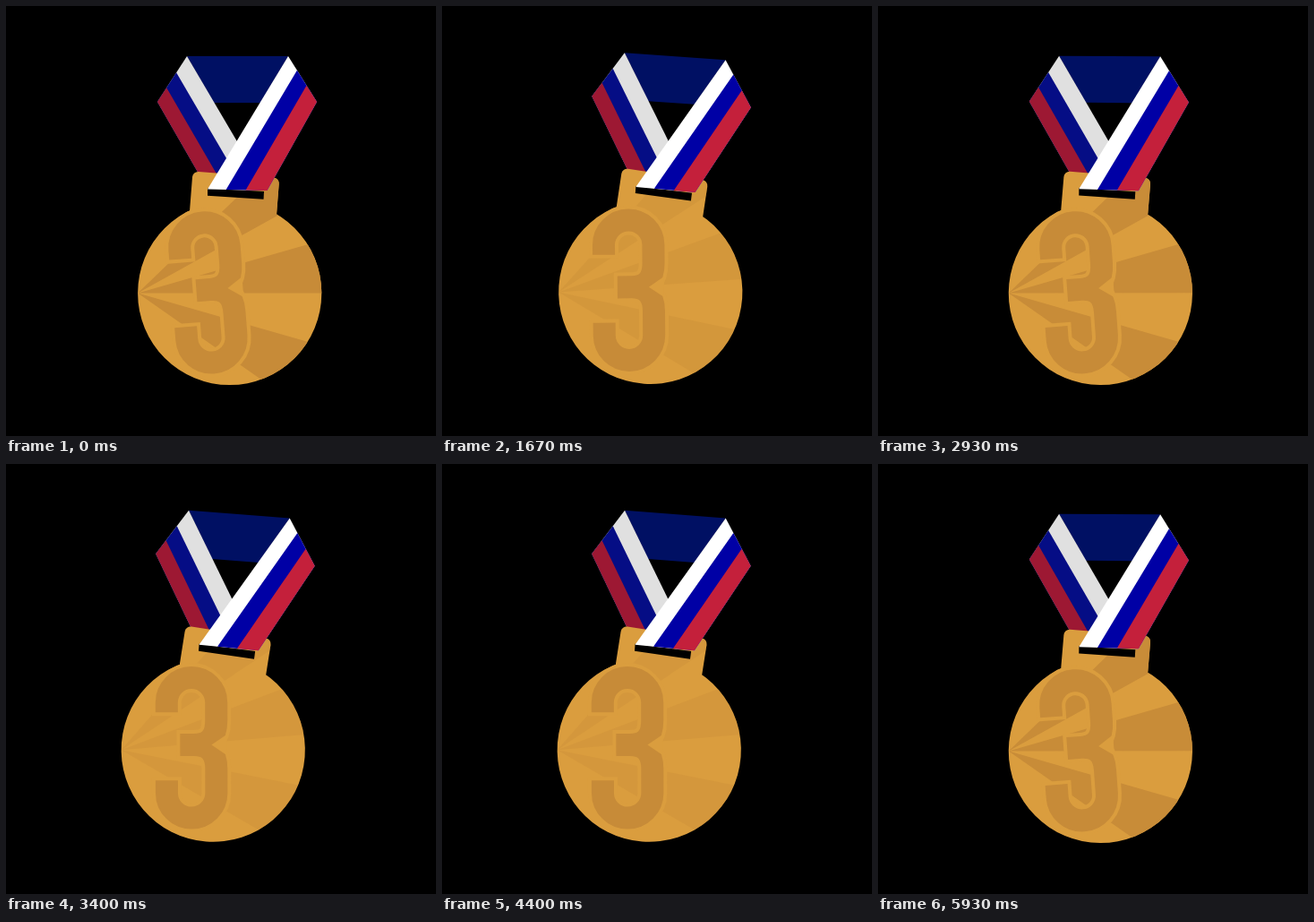
These frames come from a looping animation (480 px wide and 480 px high, 5990 ms). An HTML page with a canvas:

```html
<!DOCTYPE html>
<html lang="en">
<head>
<meta charset="utf-8">
<title>Bronze medal</title>
<style>
  html, body { margin: 0; width: 100%; height: 100%; overflow: hidden; background: #000; }
  canvas { display: block; width: 480px; height: 480px; }
</style>
</head>
<body>
<canvas id="stage" width="480" height="480"></canvas>
<script>
const ctx = document.getElementById('stage').getContext('2d');
const LOOP = 5990, STEP = 1000 / 15;
const GOLD = '#da9d3e', BRONZE = '#c78b38';
const RAD = Math.PI / 180, TILT = 4.5 * RAD;
const pivot = { x: 257, y: 80 };
const disc = { x: 249.7, y: 320.5, r: 102.6 };

const body = new Path2D();
body.arc(disc.x, disc.y, disc.r, 0, Math.PI * 2);
const tab = new Path2D();
tab.roundRect(0, 0, 97, 60, 6.5);
body.addPath(tab, new DOMMatrix().translate(208.5, 184.5).rotate(4.5));

function poly(color, ...pts) {
  ctx.fillStyle = color;
  ctx.beginPath();
  pts.forEach(([x, y]) => ctx.lineTo(x, y));
  ctx.closePath();
  ctx.fill();
}

const mix = (p, q, f) => p.map((v, i) => v + (q[i] - v) * f);

// Band from edge a-b to edge c-d; each stripe covers the rest of the one before
function band(a, b, c, d, cuts, colors) {
  colors.forEach((color, i) => {
    const f = i ? cuts[i - 1] : 0;
    poly(color, mix(a, b, f), b, d, mix(c, d, f));
  });
}

function turn(angle) {
  ctx.translate(pivot.x, pivot.y);
  ctx.rotate(angle);
  ctx.translate(-pivot.x, -pivot.y);
}

function drawRays(swing, angle) {
  ctx.save();
  ctx.clip(body);
  ctx.translate(disc.x, disc.y);
  ctx.rotate(-angle);
  ctx.translate(-disc.r, 0);
  ctx.rotate(-5 * RAD * (1 - swing) ** 2);
  ctx.globalAlpha = 0.32 + 0.68 * swing ** 1.3;
  [-44, -16, 16].forEach((start, i) => {
    const rim = deg => [300 * Math.cos(deg * RAD), 300 * Math.sin(deg * RAD)];
    poly(BRONZE, [0, 0], rim(start), rim(start + 15 + i * i));
  });
  ctx.restore();
}

// Digit made of two lobes that meet in the middle bar; pad lengthens the ends
function digit(pad) {
  const path = new Path2D();
  const left = 179, r = 27.7, right = left + 2 * r, mid = 313.5;
  for (const [side, height] of [[-1, 75], [1, 81.5]]) {
    const y = mid + side * (height - r);
    path.moveTo(left, mid + side * (height * 0.485 - pad));
    path.lineTo(left, y);
    path.arc(left + r, y, r, Math.PI, 0, side > 0);
    path.lineTo(right, mid + side * 27);
    path.quadraticCurveTo(right, mid, right - 25, mid);
    path.lineTo(194 - pad, mid);
  }
  return path;
}

const face = digit(0), rim = digit(4);

function drawDigit() {
  ctx.save();
  turn(-TILT);
  ctx.lineWidth = 33;
  ctx.strokeStyle = GOLD;
  ctx.stroke(rim);
  ctx.lineWidth = 25;
  ctx.strokeStyle = BRONZE;
  ctx.stroke(face);
  poly(GOLD, [246, 302], [229, 313.5], [246, 325]);
  ctx.restore();
}

function draw(time) {
  const swing = ((1 + Math.cos(time / 1000 * Math.PI * 2)) / 2) ** 1.65;
  const angle = TILT * (1 - swing);

  ctx.setTransform(1, 0, 0, 1, 0, 0);
  ctx.fillStyle = '#000';
  ctx.fillRect(0, 0, 480, 480);
  turn(angle);

  poly('#001063', [202, 56], [315, 56], [284, 108], [232, 108]);
  band([202, 56], [169, 107], [279, 187], [215, 187], [0.36, 0.69],
    ['#e0e0e0', '#050d85', '#9d1833']);

  ctx.fillStyle = GOLD;
  ctx.fill(body);
  drawRays(swing, angle);
  drawDigit();

  poly('#000', [225, 203.5], [288, 207], [287.5, 215.7], [225, 211.7]);
  band([315, 56], [347, 107], [225, 204.5], [291.5, 206], [0.31, 0.64],
    ['#ffffff', '#0000a5', '#c4203b']);
}

const startOf = k => Math.round(k * STEP / 10) * 10;

function tick(now) {
  const t = now % LOOP;
  let k = Math.floor(t / STEP) + 1;
  while (startOf(k) > t) k--;
  draw(k * STEP);
  requestAnimationFrame(tick);
}

draw(0);
requestAnimationFrame(tick);
</script>
</body>
</html>
```
